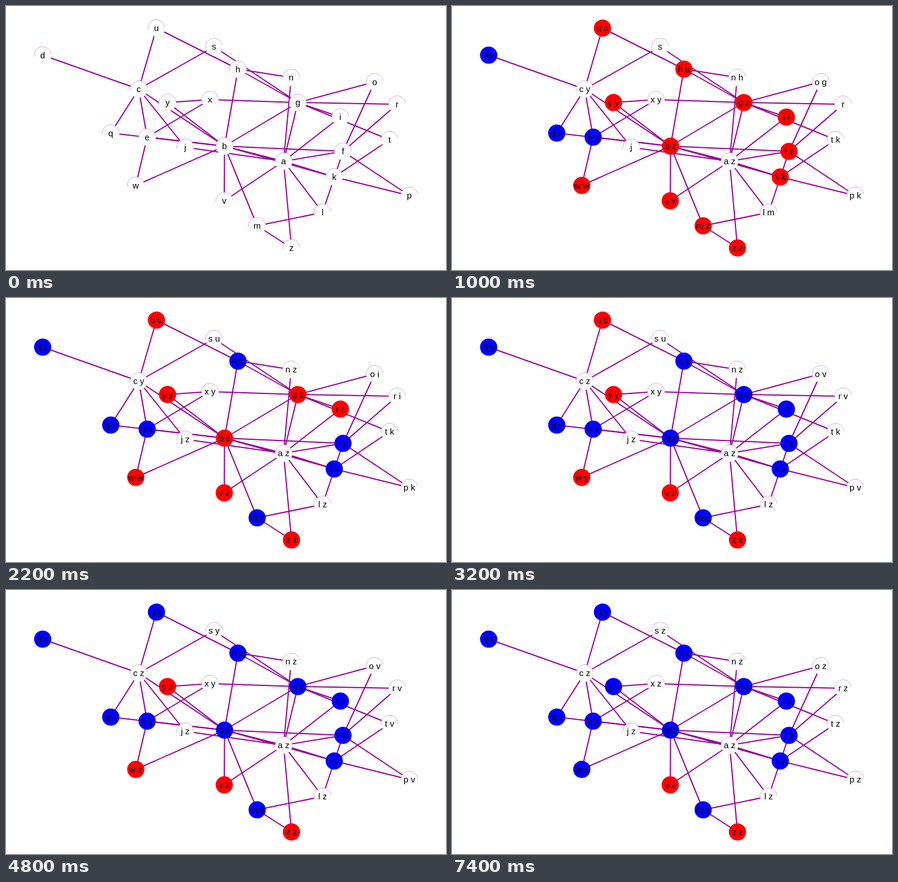
An HTML page for the animation above (8 s loop, 756 by 454 pixels).

```html
<!DOCTYPE html>
<html lang="en">
<head>
<meta charset="utf-8">
<title>Spreading the highest letter</title>
<style>
html, body { margin: 0; width: 100%; height: 100%; overflow: hidden; background: #fff; }
svg { display: block; width: 756px; height: 454px; }
line { stroke: #990099; stroke-width: 2; }
text { font: 15px "Liberation Sans", Arial, sans-serif; text-anchor: middle; fill: #000; }
.rim { fill: none; stroke: #b040b0; stroke-width: .8; stroke-dasharray: 1.2 .8; }
</style>
</head>
<body>
<svg id="stage" viewBox="0 0 756 454"></svg>
<script>
const LOOP = 8000;
const RED = '#ff0000', BLUE = '#0000ff', WHITE = '#ffffff';

const places = {
  a: [477, 267], b: [375.5, 241], c: [228, 143], d: [63, 84.5], e: [242.5, 225.5],
  f: [579, 250], g: [501.5, 166], h: [398.5, 108.5], i: [574.5, 191], j: [308, 243],
  k: [564, 294], l: [544, 355], m: [431.5, 378], n: [490, 123], o: [633.5, 130.5],
  p: [693, 326], q: [180, 218.5], r: [672, 169], s: [357.5, 70], t: [659, 230],
  u: [258.5, 38], v: [375, 335], w: [223, 308.5], x: [350.5, 161], y: [277.5, 166],
  z: [490.5, 416]
};

const links = ('dc uc uh hg sc sg cq ce cj cb yb yx xg xe qb eb ew bw bv bm bh bg bf ba bk ' +
  'ja ak hn na ga go gr gi gt ai af av az al fo fr fp fl tk kp ml mz').split(' ');

// "xy": x shows y as the best letter it knows; "x+": x turns blue.
const steps = {
  400: 'cu xy nh og tk pk lm av',
  600: 'du hu ey az',
  800: 'cy gz bz mz d+',
  1000: 'fz q+ e+',
  1200: 'm+ kz',
  1400: 'hy su ri',
  1600: 'f+ nz qy',
  1800: 'k+ oi jz',
  2000: 'h+ iz lz',
  2200: 'vz',
  2600: 'dy cz',
  2800: 'ov rv wy',
  3000: 'g+ ez pv',
  3200: 'b+ i+',
  3400: 'hz',
  3600: 'u+',
  4000: 'uy qz',
  4200: 'sy',
  4600: 'wz tv',
  4800: 'yz',
  5400: 'w+ oz',
  5600: 'rz',
  5800: 'pz',
  7000: 'y+',
  7200: 'sz tz',
  7400: 'xz'
};
const START = 200;
const candidates = 'bdefghikmquvwyz';

const stage = document.getElementById('stage');

function add(tag, attrs) {
  const el = document.createElementNS('http://www.w3.org/2000/svg', tag);
  for (const key in attrs) el.setAttribute(key, attrs[key]);
  return stage.appendChild(el);
}

for (const [from, to] of links) {
  const [x1, y1] = places[from], [x2, y2] = places[to];
  add('line', { x1, y1, x2, y2 });
}

const nodes = Object.entries(places).map(([name, [x, y]]) => ({
  name,
  disc: add('circle', { cx: x, cy: y, r: 14.8 }),
  rim: add('path', { class: 'rim', d: `M${x - 14.3} ${y + 2}A14.4 14.4 0 0 1 ${x + 14.3} ${y - 2}` }),
  label: add('text', { x, y: y + 5 })
}));

function stateAt(time) {
  const best = {}, fill = {};
  if (time >= START) {
    for (const name of candidates) {
      best[name] = name;
      fill[name] = RED;
    }
  }
  for (const at in steps) {
    if (time < +at) break;
    for (const [name, value] of steps[at].split(' ')) {
      if (value === '+') fill[name] = BLUE;
      else best[name] = value;
    }
  }
  return { best, fill };
}

function draw(time) {
  const { best, fill } = stateAt(time);
  for (const { name, disc, rim, label } of nodes) {
    const text = best[name] ? name + ' ' + best[name] : name;
    if (label.textContent !== text) label.textContent = text;
    disc.setAttribute('fill', fill[name] || WHITE);
    rim.setAttribute('visibility', fill[name] ? 'hidden' : 'visible');
  }
}

const begin = performance.now();
function tick() {
  draw((performance.now() - begin) % LOOP);
  requestAnimationFrame(tick);
}
tick();
</script>
</body>
</html>
```
